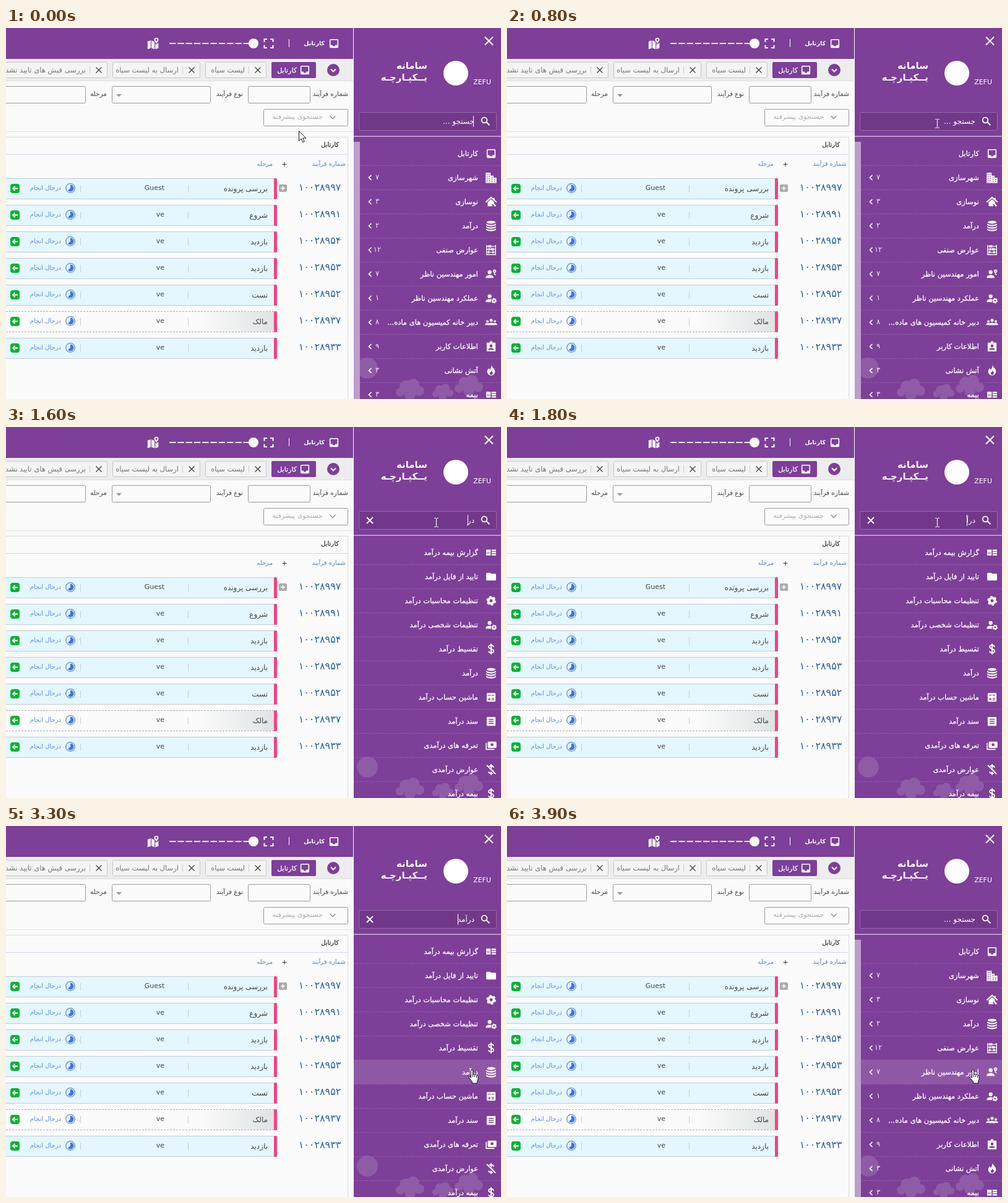
An HTML page for the animation above (4000 ms loop, 800x600 px).

```html
<!DOCTYPE html>
<html lang="fa">
<head>
<meta charset="utf-8">
<title>کارتابل</title>
<style>
html, body { margin: 0; width: 100%; height: 100%; overflow: hidden; background: #fafafa; }
svg { display: block; }
text { direction: rtl; font-family: "DejaVu Sans", sans-serif; }
.mid { text-anchor: middle; }
.bold { font-weight: bold; }
.medium { stroke: currentColor; stroke-width: .25; }
.full, .found, .typed, .caret, .hover, .pointer, .arrow, .beam, .hand {
  animation: 4s step-end infinite;
}
.full { animation-name: full; }
.found { animation-name: found; }
.typed { visibility: hidden; }
.typed:nth-of-type(1) { animation-name: typed1; }
.typed:nth-of-type(2) { animation-name: typed2; }
.typed:nth-of-type(3) { animation-name: typed3; }
.typed:nth-of-type(4) { animation-name: typed4; }
.caret { animation-name: caret; }
.hover { animation-name: hover; }
.pointer { animation-name: move; }
.arrow { animation-name: arrow; }
.beam { animation-name: beam; }
.hand { animation-name: hand; }
@keyframes full { 0%, 95% { visibility: visible } 40% { visibility: hidden } }
@keyframes found { 0%, 95% { visibility: hidden } 40% { visibility: visible } }
@keyframes typed1 { 0%, 45% { visibility: hidden } 40% { visibility: visible } }
@keyframes typed2 { 0%, 50% { visibility: hidden } 45% { visibility: visible } }
@keyframes typed3 { 0%, 52.5% { visibility: hidden } 50% { visibility: visible } }
@keyframes typed4 { 0%, 95% { visibility: hidden } 52.5% { visibility: visible } }
@keyframes caret {
  0%, 25% { transform: translateX(755px); opacity: 1 }
  12.5%, 35% { transform: translateX(755px); opacity: 0 }
  40% { transform: translateX(746px); opacity: 1 }
  45% { transform: translateX(743px); opacity: 1 }
  50% { transform: translateX(735px); opacity: 1 }
  52.5%, 77.5% { transform: translateX(730px); opacity: 1 }
  65%, 92.5% { transform: translateX(730px); opacity: 0 }
}
@keyframes hover {
  0% { opacity: 0 } 77.5% { opacity: .4 } 80% { opacity: .8 } 82.5% { opacity: 1 }
}
@keyframes move {
  0% { transform: translate(473px, 166px) }
  7.5% { transform: translate(492px, 167px) }
  10% { transform: translate(566px, 168px) }
  12.5% { transform: translate(639px, 165px) }
  15% { transform: translate(675px, 158px) }
  17.5% { transform: translate(690px, 155px) }
  20% { transform: translate(695px, 154px) }
  65% { transform: translate(700px, 180px) }
  67.5% { transform: translate(728px, 290px) }
  70% { transform: translate(746px, 367px) }
  72.5% { transform: translate(752px, 386px) }
  77.5% { transform: translate(753px, 394px) }
}
@keyframes arrow { 0% { visibility: visible } 15% { visibility: hidden } }
@keyframes beam { 0%, 77.5% { visibility: hidden } 15% { visibility: visible } }
@keyframes hand { 0% { visibility: hidden } 77.5% { visibility: visible } }
</style>
</head>
<body>
<svg id="stage" width="800" height="600" viewBox="0 0 800 600"></svg>
<script>
const PURPLE = '#7d3f98', WHITE = '#fff', GREY = '#999', BLUE = '#5a8bea';

const rect = (x, y, w, h, fill, more = '') =>
  `<rect x="${x}" y="${y}" width="${w}" height="${h}" fill="${fill}" ${more}/>`;
const frame = (x, y, w, h, fill, stroke, rx = 2) =>
  rect(x + .5, y + .5, w - 1, h - 1, fill, `stroke="${stroke}" rx="${rx}"`);
const line = (d, color, w = 1, more = '') =>
  `<path d="${d}" fill="none" stroke="${color}" stroke-width="${w}" ${more}/>`;
const disc = (x, y, r, fill, more = '') => `<circle cx="${x}" cy="${y}" r="${r}" fill="${fill}" ${more}/>`;
const fill = (d, color = WHITE, rule = 'evenodd') => `<path d="${d}" fill="${color}" fill-rule="${rule}"/>`;
const text = (s, x, y, size, color, cls = '') =>
  `<text x="${x}" y="${y}" font-size="${size}" fill="${color}" color="${color}" class="${cls}">${s}</text>`;
const cross = (x, y, r, color, w) =>
  line(`M${x - r} ${y - r}l${2 * r} ${2 * r}m0 ${-2 * r}l${-2 * r} ${2 * r}`, color, w);
const group = (cls, ...parts) => `<g class="${cls}">${parts.join('')}</g>`;

// Icons on a 24 unit grid
const gear = (x, y, r) =>
  disc(x, y, r * .62, 'none', `stroke="#fff" stroke-width="${r * .55}"`) +
  disc(x, y, r * .9, 'none', `stroke="#fff" stroke-width="${r * .4}" pathLength="12" stroke-dasharray="1"`);
const person = (x, y, k) =>
  disc(x, y, 4 * k, WHITE) +
  fill(`M${x - 8 * k} ${y + 12 * k}c0 ${-5 * k} ${4 * k} ${-6 * k} ${8 * k} ${-6 * k}s${8 * k} ${k} ${8 * k} ${6 * k}z`);
const coin = y => fill(`M2 ${y}c2 4 18 4 20 0v2.6c-2 4.4-18 4.4-20 0z`);
const dollar = line('M17 8c-1-5-10-5-10-.5 0 5 10 3.5 10 8.5s-9 5-10 .5M12 1v22', WHITE, 2.4);

const icons = {
  inbox: fill('M19 3H5a2 2 0 0 0-2 2v14a2 2 0 0 0 2 2h14a2 2 0 0 0 2-2V5a2 2 0 0 0-2-2zm0 12h-4a3 3 0 0 1-6 0H5V5h14z'),
  search: disc(9.5, 9.5, 5.5, 'none', 'stroke="#fff" stroke-width="2.2"') + line('M14 14l6 6', WHITE, 2.8),
  expand: line('M4 9V4h5M15 4h5v5M20 15v5h-5M9 20H4v-5', WHITE, 2.4),
  map: fill('M1 8l6-2v15l-6 2zM8.5 6l6 3v14l-6-2zM16 13l6-2v10l-6 2z') +
    fill('M18 14c-9-9-4-14 0-14s9 5 0 14z', PURPLE) +
    fill('M18 12c-7-7-4-11 0-11s7 4 0 11zM16 5a2 2 0 1 0 4 0 2 2 0 1 0-4 0z'),
  city: fill('M1 2h10v6h6v4h6v11H1z') +
    line('M4 5v17M8 5v17M14 11v11M19.5 15v7', PURPLE, 1.8, 'stroke-dasharray="2"'),
  house: line('M1 13L12 3l11 10M18 4v4', WHITE, 2.6) +
    fill('M5 13l7-6 5 4-4 5 2 5H5z') + line('M15 14l6 7', WHITE, 3) + disc(15, 14, 3, WHITE),
  coins: '<ellipse cx="12" cy="4.5" rx="9" ry="3" fill="#fff"/>' + coin(7) + coin(12) + coin(17),
  abacus: line('M3 2v20M21 2v20M2 21.5h20M3 4.5h18M3 10.5h18M3 16.5h18', WHITE, 1.7) +
    line('M7.5 2v5M11 2v5M8 8v5M16 8v5M12.5 8v5M7 14v5M16 14v5', WHITE, 2.5),
  chief: person(9, 8, 1) + disc(19, 6, 2.4, 'none', 'stroke="#fff" stroke-width="2"') + line('M18 10l3 4', WHITE, 2),
  staff: person(9, 8, 1) + disc(18, 17, 6.4, PURPLE) + gear(18, 17, 5),
  team: person(4.5, 10, .62) + person(19.5, 10, .62) + disc(12, 8, 4.6, PURPLE) + person(12, 8, .8),
  badge: fill('M4 4h5a3 3 0 0 1 6 0h5q1 0 1 1v16q0 1-1 1H4q-1 0-1-1V5q0-1 1-1zm8 4a3 3 0 1 0 0 6 3 3 0 1 0 0-6zm-6 11h12c0-5-12-5-12 0z'),
  flame: fill('M13 1c1 5 7 7 7 13a8 8 0 0 1-16 0c0-3 2-5 3-7 1 2 2 3 3 3 2-3 2-6 3-9zM12 21c6-2 3-6 1-9-1 3-2 3-4 5 0 2 1 3 3 4z'),
  card: fill('M2 6h9v12H2zM13 6h9v3h-9zM13 10.5h9v3h-9zM13 15h9v3h-9z') + line('M3 13h7', PURPLE, 1.4),
  folder: fill('M10 4H4a2 2 0 0 0-2 2v12a2 2 0 0 0 2 2h16a2 2 0 0 0 2-2V8a2 2 0 0 0-2-2h-8z'),
  gear: gear(12, 12, 9),
  dollar,
  calc: rect(3, 3, 18, 18, WHITE, 'rx="2"') +
    line('M6 8h5M13 8h5M8.5 13.5v5M6 16h5M13 14.5h5M13 17.5h5', PURPLE, 1.6),
  doc: rect(3, 3, 18, 18, WHITE, 'rx="1"') + line('M7 8h10M7 12h10M7 16h10', PURPLE, 1.8),
  bills: rect(5, 4, 18, 13, WHITE, 'rx="2"') + disc(14, 10.5, 3, PURPLE) + line('M2 7v13h17', WHITE, 2),
  nodollar: dollar + line('M3 5l18 16', PURPLE, 5) + line('M3 3l18 18', WHITE, 2.2),
};
const icon = (name, x, y, size = 19) =>
  `<g transform="translate(${x - size / 2} ${y - size / 2}) scale(${size / 24})">${icons[name]}</g>`;

function header() {
  return rect(0, 0, 561, 50, PURPLE) +
    icon('inbox', 530, 25) + text('کارتابل', 515, 28, 9.5, WHITE, 'bold') +
    line('M457.5 18v13', WHITE) + icon('expand', 424.5, 25, 21) +
    line('M264 25H393', WHITE, 2, 'stroke-dasharray="10.3 3"') + disc(400, 25, 8, WHITE) +
    icon('map', 238, 25, 20);
}

function tab(x, w, label) {
  const r = x + w;
  return frame(x, 55, w, 26, '#f4f4f4', '#c6c6c6') + cross(r - 14, 68, 4.5, '#444', 1.4) +
    line(`M${r - 28.5} 62v12`, '#ccc') + text(label, r - 35, 72, 11.5, '#777');
}

function tabs() {
  return rect(0, 50, 561, 35, '#ededee') + rect(0, 85, 561, 1, '#dedede') +
    disc(529, 68, 10, PURPLE) + line('M525 66.5l4 4 4-4', WHITE, 2) +
    rect(429, 55, 72, 26, PURPLE, 'rx="2"') + icon('inbox', 483, 68) +
    text('کارتابل', 470, 72, 11, WHITE, 'medium') +
    tab(322, 99, 'لیست سیاه') + tab(172, 142, 'ارسال به لیست سیاه') +
    tab(-30, 194, 'بررسی فیش های تایید نشده');
}

function filters() {
  return text('شماره فرآیند', 553, 110, 10.5, '#444') + frame(391, 94, 101, 28, '#fbfbfb', GREY) +
    text('نوع فرآیند', 383, 110, 10.5, '#444') + frame(171, 94, 160, 28, '#fbfbfb', GREY) +
    fill('M178 107h9l-4.5 4.5z', GREY) +
    text('مرحله', 163, 110, 10.5, '#444') + frame(-10, 94, 139, 28, '#fbfbfb', GREY) +
    frame(416, 131, 137, 28, '#fbfbfb', GREY) + line('M523.5 142l4.5 4.5 4.5-4.5', GREY, 1.6) +
    text('جستجوی پیشرفته', 512, 147, 11, '#aaa') + rect(0, 167, 561, 1, '#e2e2e2');
}

const cases = [
  ['۱۰۰۲۸۹۹۷', 'بررسی پرونده', 'Guest'], ['۱۰۰۲۸۹۹۱', 'شروع'], ['۱۰۰۲۸۹۵۴', 'بازدید'],
  ['۱۰۰۲۸۹۵۳', 'بازدید'], ['۱۰۰۲۸۹۵۲', 'تست'], ['۱۰۰۲۸۹۳۷', 'مالک'], ['۱۰۰۲۸۹۳۳', 'بازدید'],
];

function caseRow([number, stage, user = 've'], i) {
  const y = 244 + 43 * i, mid = y + 15, idle = i === 5;
  return (idle ? rect(310, y, 124, 32, 'url(#fade)') : rect(0, y, 434, 32, '#e4f7ff')) +
    line(`M0 ${y - .5}H434M0 ${y + 32.5}H434`, idle ? '#aaa' : '#c3ccd0', 1, idle ? 'stroke-dasharray="3 2"' : '') +
    rect(433, y - 1, 5, 34, '#fb3f7d', 'rx="1.5"') +
    text(stage, 423, mid + 5, 12, '#444') + line(`M294.5 ${mid - 5}v12M120.5 ${mid - 5}v12`, '#c8cdd0') +
    text(user, 256, mid + 3, 11, '#444') +
    disc(104, mid, 7.3, 'none', `stroke="${BLUE}" stroke-width="1.3"`) +
    fill(`M104 ${mid}v-5.5a5.5 5.5 0 1 1-4 9.3z`, '#3f74e6') +
    text('درحال انجام', 89, mid + 3, 10, BLUE) +
    rect(7, mid - 7, 15, 15, '#04b431', 'rx="4"') +
    line(`M19 ${mid + .5}h-8m3.5-3.5l-3.5 3.5 3.5 3.5`, WHITE, 1.8) +
    text(number, 507, mid + 4, 16, '#2c609f', 'mid');
}

function table() {
  return frame(-5, 176, 558, 440, '#fbfbfb', '#dcdcdc', 0) +
    text('کارتابل', 538, 192, 10, '#333', 'medium') + rect(0, 204, 552, 1, '#d9d3ee') +
    text('شماره فرآیند', 549, 223, 10, '#5584bd') + line('M446.5 220.5h7m-3.5-3.5v7', '#333') +
    text('مرحله', 431, 223, 10, '#5584bd') +
    rect(441, 253, 13, 12, '#aaa', 'rx="2"') + line('M444 259h7m-3.5-3.5v7', WHITE, 1.6) +
    cases.map(caseRow).join('');
}

const menu = [
  ['inbox', 'کارتابل'], ['city', 'شهرسازی', '۷'], ['house', 'نوسازی', '۳'], ['coins', 'درآمد', '۲'],
  ['abacus', 'عوارض صنفی', '۱۲'], ['chief', 'امور مهندسین ناظر', '۷'], ['staff', 'عملکرد مهندسین ناظر', '۱'],
  ['team', 'دبیر خانه کمیسیون های ماده...', '۸'], ['badge', 'اطلاعات کاربر', '۹'],
  ['flame', 'آتش نشانی', '۳'], ['card', 'بیمه', '۳'],
];
const results = [
  ['card', 'گزارش بیمه درآمد'], ['folder', 'تایید از فایل درآمد'], ['gear', 'تنظیمات محاسبات درآمد'],
  ['staff', 'تنظیمات شخصی درآمد'], ['dollar', 'تقسیط درآمد'], ['coins', 'درآمد'],
  ['calc', 'ماشین حساب درآمد'], ['doc', 'سند درآمد'], ['bills', 'تعرفه های درآمدی'],
  ['nodollar', 'عوارض درآمدی'], ['dollar', 'بیمه درآمد'],
];

function menuRow([name, label, count], i) {
  const y = 203 + 39 * i;
  return icon(name, 784, y) + text(label, 763, y + 4, 11.5, WHITE, 'medium') +
    (count ? text(count, 600, y + 3, 11.5, '#f0e6f4', 'mid') + line(`M590.5 ${y - 4}l-4 4 4 4`, WHITE, 1.7) : '');
}

const puffs = [[-16, 4, 7], [-7, -5, 10], [5, -8, 10], [15, 2, 8], [0, 8, 9]];
const cloud = (x, y, k) => fill(puffs.map(([dx, dy, r]) => {
  r *= k;
  return `M${x + dx * k - r} ${y + dy * k}a${r} ${r} 0 1 0 ${2 * r} 0a${r} ${r} 0 1 0 ${-2 * r} 0z`;
}).join(''), WHITE, 'nonzero');

function sidebar() {
  const dashes = menu.map((_, i) => `M562 ${222.5 + 39 * i}H800`).join('');
  return rect(562, 0, 238, 600, PURPLE) +
    `<g opacity=".14">${disc(584, 550, 17, WHITE)}${cloud(653, 585, 1)}${cloud(706, 589, .75)}${cloud(748, 579, 1)}</g>` +
    cross(780.5, 21, 6.5, WHITE, 2.2) +
    disc(727, 73, 20, WHITE) + text('ZEFU', 784, 91, 11, WHITE) +
    text('سامانه', 681, 66, 15, WHITE, 'bold') + text('یــکپـارچـه', 681, 85, 15, WHITE, 'bold') +
    frame(570, 136, 223, 30, '#71388a', '#9a68b0') + icon('search', 775, 151) +
    rect(562, 174.5, 238, 1.5, '#cfb2db') +
    line(dashes, '#9360aa', 1, 'stroke-dasharray="3 2"') +
    rect(562, 378, 238, 39, '#8f58a6', 'class="hover"') +
    group('full', text('جستجو ...', 757, 155, 12, WHITE), rect(562, 184, 10, 416, '#bd9dcb'), ...menu.map(menuRow)) +
    group('found', cross(588, 151, 5, WHITE, 1.8), ...results.map(menuRow)) +
    group('', ...['در', 'درآ', 'درآم', 'درآمد'].map(s => text(s, 757, 155, 12, WHITE, 'typed'))) +
    rect(0, 142, 1, 18, WHITE, 'class="caret"');
}

function pointer() {
  const ink = 'fill="#fff" stroke="#111" stroke-linejoin="round"';
  return group('pointer',
    `<path class="arrow" ${ink} d="M.5 .5v16l3.7-3.5 2.6 5.8 2.5-1.1-2.6-5.6h5z"/>`,
    group('beam', line('M-3 -6.5h3M1 -6.5h3M.5 -6v13M-3 7.5h3M1 7.5h3', '#f4eef7', 1.2)),
    group('hand',
      `<path ${ink} d="M-1.5 1q1.5-2 3 0v7l1.5-.7 2 1 2-.2 1.5 1.5q1.5 0 1.5 2v4l-1.5 3v3.5h-8v-2.5l-5.500-6.500q-.5-2.5 1.5-2l2 2z"/>`,
      line('M1.5 8v4M4.5 9v3M7.5 10v3', '#111')));
}

document.getElementById('stage').innerHTML =
  '<defs><linearGradient id="fade"><stop stop-color="#dfe3e4" stop-opacity="0"/><stop offset="1" stop-color="#dfe3e4"/></linearGradient></defs>' +
  rect(0, 0, 800, 600, '#fafafa') + header() + tabs() + filters() + table() + sidebar() + pointer();
</script>
</body>
</html>
```
